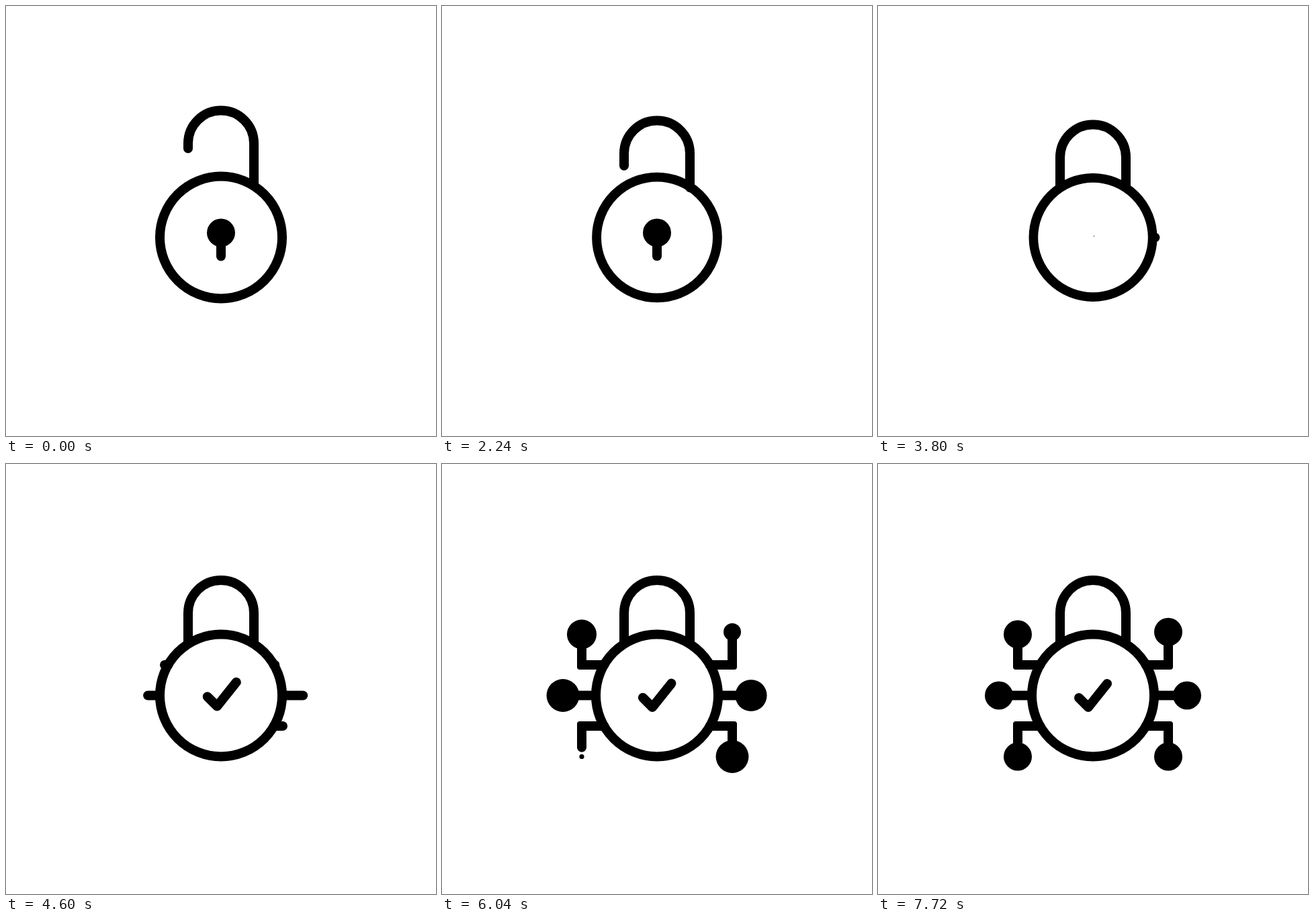
An HTML page with a canvas for the animation above (9400 ms loop, 640 by 640 pixels).

```html
<!DOCTYPE html>
<html lang="en">
<head>
<meta charset="utf-8">
<title>Lock</title>
<style>
  html, body { margin: 0; width: 100%; height: 100%; overflow: hidden; background: #fff; }
  canvas { display: block; width: 640px; height: 640px; }
</style>
</head>
<body>
<canvas width="640" height="640"></canvas>
<script>
const ctx = document.querySelector("canvas").getContext("2d");
const LOOP = 9400, START = 1800, LAST_STEP = 53;
const CX = 320, CY = 344.5, RADIUS = 91, STROKE = 14;

// Each branch: points from the ring outwards, node centre, start times of line and node.
const BRANCHES = [
  { points: [[411, CY], [460, CY]], node: [460, CY], line: 3390, grow: 4617, span: 2200 },
  { points: [[229, CY], [180, CY]], node: [180, CY], line: 3610, grow: 4837, span: 2200 },
  { points: [[398.8, 390], [432, 390], [432, 428.5]], node: [432, 435.5], line: 3780, grow: 5080 },
  { points: [[241.2, 299], [208, 299], [208, 260.5]], node: [208, 253.5], line: 4000, grow: 5300 },
  { points: [[398.8, 299], [432, 299], [432, 257]], node: [432, 250], line: 4210, grow: 5510 },
  { points: [[241.2, 390], [208, 390], [208, 428.5]], node: [208, 435.5], line: 4420, grow: 5700 },
];

const mix = (a, b, p) => a + (b - a) * p;

function ease(time, start, span) {
  const u = Math.min(1, Math.max(0, (time - start) / span));
  return u < 0.5 ? 4 * u ** 3 : 1 - 4 * (1 - u) ** 3;
}

// The motion advances in even steps that are shown at a slightly uneven beat.
function steppedTime(t) {
  if (t < START) return 0;
  const block = Math.floor((t - START) / 560);
  const rest = (t - START) % 560;
  const index = [140, 180, 320, 440].filter(beat => rest >= beat).length;
  return START + 112 * Math.min(LAST_STEP, block * 5 + index);
}

function disc(x, y, r) {
  ctx.beginPath();
  ctx.arc(x, y, Math.max(0, r), 0, Math.PI * 2);
  ctx.fill();
}

function polyline(points, width = STROKE) {
  ctx.lineWidth = width;
  ctx.beginPath();
  points.forEach(([x, y]) => ctx.lineTo(x, y));
  ctx.stroke();
}

function drawShackle(time) {
  const down = ease(time, 1640, 1315);
  const up = ease(time, 2885, 1427);
  const arcY = 204.5 + 38 * down - 20.5 * up;
  const leftEnd = mix(212, 277, down) - 11 * up;
  const rightEnd = mix(266, 277, down) - 11 * up;
  ctx.lineWidth = STROKE;
  ctx.beginPath();
  ctx.moveTo(271, leftEnd);
  ctx.lineTo(271, arcY);
  ctx.arc(CX, arcY, 49, Math.PI, 0);
  ctx.lineTo(369, rightEnd);
  ctx.stroke();
}

function drawBody(time) {
  const scale = 1 - 0.1 * (ease(time, 1820, 1380) - ease(time, 3097, 1200));
  ctx.lineWidth = STROKE * scale;
  ctx.beginPath();
  ctx.arc(CX, CY, RADIUS * scale, 0, Math.PI * 2);
  ctx.stroke();
}

function drawKeyhole(time) {
  const scale = 1 - ease(time, 2700, 1000);
  if (scale <= 0) return;
  ctx.save();
  ctx.translate(CX, 348);
  ctx.scale(scale, scale);
  disc(0, -10.5, 21);
  polyline([[0, -10.5], [0, mix(24.5, -8, ease(time, 2150, 850))]]);
  ctx.restore();
}

function drawCheck(time) {
  const settle = ease(time, 5300, 1100);
  const scale = 1.11 * ease(time, 3500, 1500) - 0.11 * settle;
  if (scale < 0.005) return;
  const x = mix(321.3, CX, settle), y = mix(342.6, CY, settle);
  const points = [[-21, 3.5], [-7, 17.5], [21, -17.5]];
  polyline(points.map(([px, py]) => [x + px * scale, y + py * scale]), STROKE * Math.min(1, scale));
}

function drawBranch({ points, node, line, grow, span = 2290 }, time) {
  const drawn = ease(time, line, span);
  if (drawn < 0.004) return;
  const lengths = points.slice(1).map(([x, y], i) => Math.hypot(x - points[i][0], y - points[i][1]));
  let left = drawn * lengths.reduce((a, b) => a + b);
  const path = [points[0]];
  lengths.forEach((length, i) => {
    if (left <= 0) return;
    const part = Math.min(1, left / length);
    path.push([0, 1].map(k => mix(points[i][k], points[i + 1][k], part)));
    left -= length;
  });
  polyline(path);
  if (path.length > 2) {
    ctx.beginPath();
    ctx.roundRect(path[1][0] - 7, path[1][1] - 7, 14, 14, 4);
    ctx.fill();
  }
  disc(...node, 24.5 * ease(time, grow, 1070) - 3.5 * ease(time, grow + 1073, 900));
}

function draw(now) {
  const time = steppedTime(now % LOOP);
  ctx.fillStyle = "#fff";
  ctx.fillRect(0, 0, 640, 640);
  ctx.fillStyle = ctx.strokeStyle = "#000";
  ctx.lineCap = ctx.lineJoin = "round";
  BRANCHES.forEach(branch => drawBranch(branch, time));
  drawShackle(time);
  drawBody(time);
  drawKeyhole(time);
  drawCheck(time);
}

const begin = performance.now();
function tick() {
  draw(performance.now() - begin);
  requestAnimationFrame(tick);
}
tick();
</script>
</body>
</html>
```
